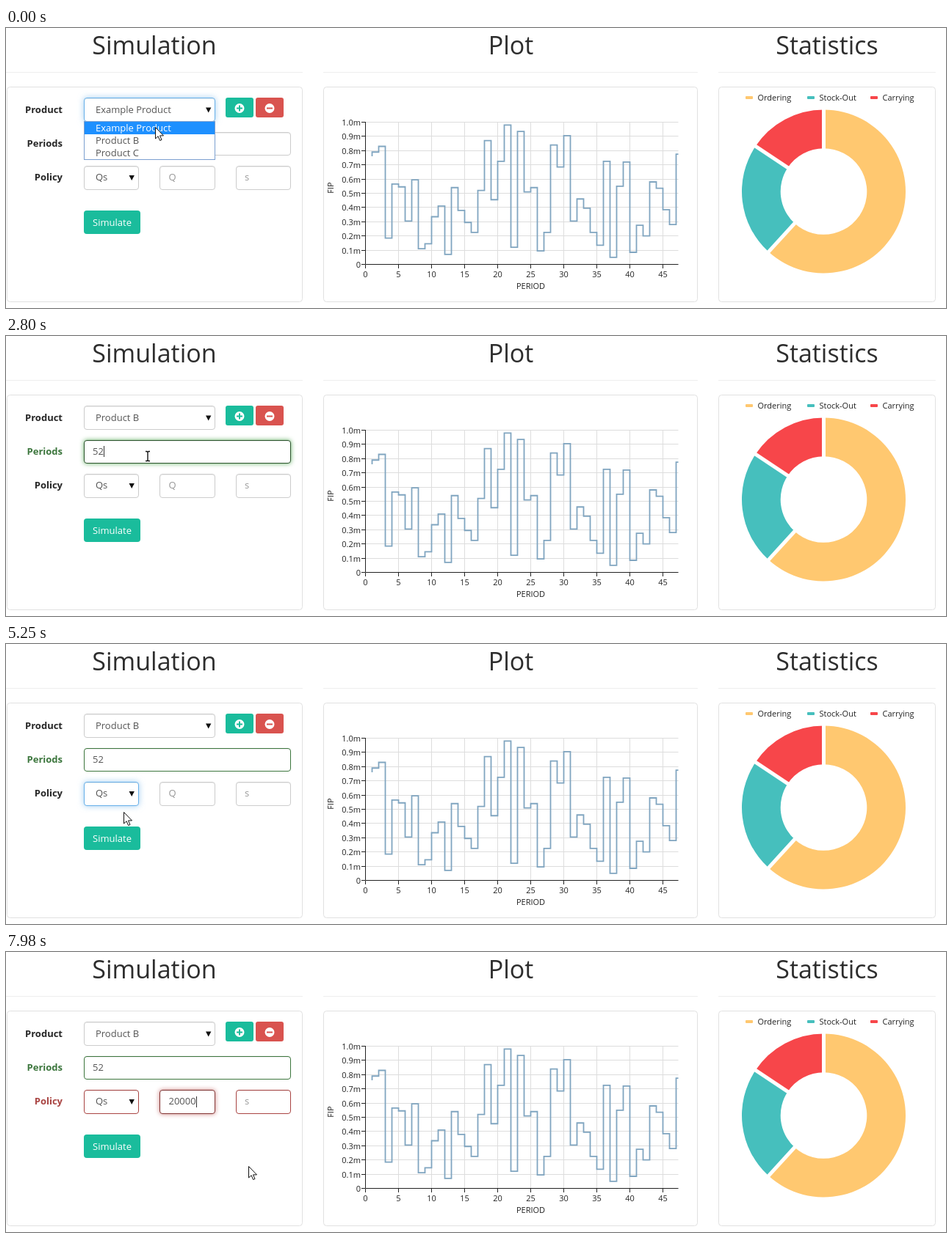
An HTML page for the animation above (8000 ms loop, 1280x382 px).

```html
<!DOCTYPE html>
<html lang="en">
<head>
<meta charset="utf-8">
<title>Inventory simulation</title>
<style>
  html, body { margin: 0; width: 100%; height: 100%; overflow: hidden; background: #fff; }
  .field {
    position: absolute; box-sizing: border-box; height: 33px;
    border: 1px solid #ccc; border-radius: 4px; background: #fff;
  }
  svg { position: absolute; left: 0; top: 0; width: 1280px; height: 382px; }
  text { font: 13px "Open Sans", "Noto Sans", sans-serif; fill: #555; white-space: pre; }
  .title { font-size: 34px; font-weight: 500; fill: #2d2d2d; text-anchor: middle; }
  .label { font-weight: 700; fill: #262626; text-anchor: end; }
  .hint { fill: #999; }
  .small { font-size: 11px; fill: #222; }
  .mid { text-anchor: middle; }
  .end { text-anchor: end; }
  .white { fill: #fff; }
  .frame { fill: none; stroke: #e1e1e1; }
  .grid { stroke: #ddd; }
  .axis { stroke: #222; fill: none; }
  .list { fill: #fff; stroke: #7b9fd0; }
</style>
</head>
<body>
<div class="field" id="product" style="left:106px;top:95px;width:179px"></div>
<div class="field" id="periods" style="left:106px;top:142px;width:282px;height:32px"></div>
<div class="field" id="policy" style="left:106px;top:188px;width:75px"></div>
<div class="field" id="qty" style="left:209px;top:188px;width:76px"></div>
<div class="field" id="level" style="left:313px;top:188px;width:75px"></div>

<svg viewBox="0 0 1280 382">
  <text class="title" x="202" y="36">Simulation</text>
  <text class="title" x="687.5" y="36">Plot</text>
  <text class="title" x="1118" y="36">Statistics</text>
  <path d="M0 60.5H404M432 60.5H942M970 60.5H1266" stroke="#eee"/>
  <rect class="frame" x="1.5" y="80.5" width="402" height="293" rx="4"/>
  <rect class="frame" x="432.5" y="80.5" width="509" height="293" rx="4"/>
  <rect class="frame" x="970.5" y="80.5" width="295" height="293" rx="4"/>

  <text class="label" x="77" y="116">Product</text>
  <text class="label" id="periodsLabel" x="77" y="162">Periods</text>
  <text class="label" id="policyLabel" x="77" y="208">Policy</text>
  <text id="productText" x="122" y="116"></text>
  <text id="periodsText" x="118" y="162"></text>
  <text x="122" y="208">Qs</text>
  <text id="qtyText" x="221.5" y="208"></text>
  <text class="hint" x="325" y="208">s</text>
  <path d="M272 108.5h7.4l-3.7 7zM167.5 201h7.4l-3.7 7z" fill="#111"/>

  <rect x="299" y="95" width="38" height="27" rx="3" fill="#1abc9c"/>
  <rect x="340" y="95" width="38" height="27" rx="3" fill="#d9534f"/>
  <circle cx="318" cy="109.5" r="6.5" fill="#fff"/>
  <circle cx="359" cy="109.5" r="6.5" fill="#fff"/>
  <path d="M314 109.5h8M318 105.5v8" stroke="#1abc9c" stroke-width="2"/>
  <path d="M355 109.5h8" stroke="#d9534f" stroke-width="2"/>
  <rect x="106" y="249" width="77" height="32" rx="4" fill="#1abc9c"/>
  <text class="white mid" x="144.5" y="270">Simulate</text>

  <g id="chart"></g>
  <text class="small mid" x="714.5" y="355.5">PERIOD</text>
  <text class="small mid" transform="translate(446 218) rotate(-90)">FIP</text>
  <g id="donut"></g>

  <g id="productList"></g>
  <g id="policyList"></g>
  <rect id="caret" width="1" height="15" fill="#333"/>
  <g id="cursor">
    <path id="arrow" d="M.5 .5V16l3.6-3.3 2.5 5.8 2.4-1-2.5-5.6h5z" fill="#fff" stroke="#111"/>
    <path id="beam" d="M-3-6.5h2l1 1 1-1h2M0-5.5v11M-3 6.5h2l1-1 1 1h2" fill="none" stroke="#111" stroke-width="1.4"/>
  </g>
</svg>

<script>
const LOOP = 8000, TICK = 70;
const $ = id => document.getElementById(id);

function add(parent, tag, attrs, text) {
  const el = document.createElementNS('http://www.w3.org/2000/svg', tag);
  for (const name in attrs) el.setAttribute(name, attrs[name]);
  if (text !== undefined) el.textContent = text;
  parent.append(el);
  return el;
}

function drawChart() {
  const g = $('chart'), right = 915.5;
  const px = period => 489.5 + period * 9;
  const py = percent => 322.5 - percent * 1.94;
  const percents = [
    79, 83, 18.5, 56.5, 54.5, 30.5, 59.5, 11, 14.5, 33.5, 41, 7, 54, 38, 29.5, 22.5,
    52, 87, 45.5, 72.5, 98, 12, 93.5, 51, 54, 9.5, 22.5, 84, 68.5, 90.5, 30.5, 46,
    39.5, 22.5, 13.5, 72.5, 5, 55, 72, 8.5, 27.5, 20, 58, 53.5, 38.5, 28
  ];
  for (let i = 0; i <= 10; i++) {
    const y = Math.floor(py(i * 10)) + .5;
    add(g, 'path', { class: 'grid', d: `M490 ${y}H${right}` });
    add(g, 'path', { class: 'axis', d: `M484 ${y}h5` });
    add(g, 'text', { class: 'small end', x: 483, y: y + 4 }, i ? (i / 10).toFixed(1) + 'm' : '0');
  }
  for (let p = 0; p <= 45; p += 5) {
    add(g, 'path', { class: 'grid', d: `M${px(p)} 128V322` });
    add(g, 'path', { class: 'axis', d: `M${px(p)} 323v5` });
    add(g, 'text', { class: 'small mid', x: px(p), y: 340 }, p);
  }
  add(g, 'path', { class: 'axis', d: `M489.5 128V322.5H${right}` });
  const steps = percents.map((v, i) => `V${py(v)}H${px(i + 2)}`).join('');
  add(g, 'path', {
    d: `M${px(1)} ${py(76)}${steps}V${py(77.5)}H${right}`,
    fill: 'none', stroke: '#80a5c0', 'stroke-width': 1.8
  });
}

function drawDonut() {
  const g = $('donut'), cx = 1113.5, cy = 223, outer = 111.5, inner = 58.8;
  const point = (deg, r) => {
    const a = deg * Math.PI / 180;
    return `${cx + r * Math.sin(a)} ${cy - r * Math.cos(a)}`;
  };
  const slices = [
    ['Ordering', '#ffc870', 0, 222.4, 1007],
    ['Stock-Out', '#46bfbd', 222.4, 303.6, 1091],
    ['Carrying', '#f7464a', 303.6, 360, 1177]
  ];
  for (const [name, fill, from, to, x] of slices) {
    const big = to - from > 180 ? 1 : 0;
    add(g, 'path', { fill, d: `M${point(from, outer)}A${outer} ${outer} 0 ${big} 1 ${point(to, outer)}` +
      `L${point(to, inner)}A${inner} ${inner} 0 ${big} 0 ${point(from, inner)}z` });
    add(g, 'rect', { x, y: 93, width: 10, height: 4, rx: 1, fill });
    add(g, 'text', { class: 'small', x: x + 16.5, y: 98.5 }, name);
  }
  for (const slice of slices)
    add(g, 'path', { d: `M${point(slice[2], inner - 2)}L${point(slice[2], outer + 2)}`, stroke: '#fff', 'stroke-width': 5 });
}

const ROW = 17;

function makeList(id, top, width, names) {
  const g = $(id);
  add(g, 'rect', { class: 'list', x: 106.5, y: top + .5, width: width - 1, height: names.length * ROW + 1 });
  const bar = add(g, 'rect', { x: 107, width: width - 2, height: ROW, fill: '#1e90ff' });
  const rows = names.map((name, i) => add(g, 'text', { x: 122, y: top + 13.5 + i * ROW }, name));
  return (open, y) => {
    g.style.display = open ? '' : 'none';
    const pick = Math.max(0, Math.min(names.length - 1, Math.floor((y - top - 1) / ROW)));
    bar.setAttribute('y', top + 1 + pick * ROW);
    rows.forEach((row, i) => row.classList.toggle('white', i === pick));
  };
}

// Border colour, glow colour, glow opacity, glow blur
const LOOKS = {
  plain: [204, 204, 204, 102, 175, 233, 0, 8],
  blue: [102, 175, 233, 102, 175, 233, .6, 8],
  green: [60, 118, 61, 103, 177, 104, 0, 6],
  greenFocus: [43, 84, 44, 103, 177, 104, 1, 6],
  red: [169, 68, 66, 206, 132, 131, 0, 6],
  redFocus: [132, 53, 52, 206, 132, 131, 1, 6]
};

// Each look begins at a tick and fades in over the next two
const FIELDS = {
  product: [[-9, 'blue'], [18, 'plain']],
  periods: [[-9, 'plain'], [18, 'blue'], [30, 'greenFocus'], [53, 'green']],
  policy: [[-9, 'plain'], [53, 'blue'], [85, 'plain'], [93, 'red']],
  qty: [[-9, 'plain'], [85, 'blue'], [93, 'redFocus']],
  level: [[-9, 'plain'], [93, 'red']]
};

// First tick, last tick, end point
const MOVES = [
  [1, 3, 202, 152], [11, 11, 201, 154], [13, 14, 197, 157], [40, 45, 172, 201],
  [52, 52, 171, 203], [54, 61, 162, 241], [63, 65, 160, 229], [77, 83, 221, 211], [96, 97, 330, 292]
];

const PERIOD_KEYS = [30, 36], QTY_KEYS = [93, 104, 109, 111, 114];
const PERIOD_CARET = [[18, 25], [30, 42], [49, 52]], QTY_CARET = [[85, 102], [104, 115]];

const lerp = (a, b, k) => a + (b - a) * k;
const within = (n, spans) => spans.some(([from, to]) => n >= from && n < to);

function cursorAt(n) {
  let x = 203, y = 135;
  for (const [from, to, endX, endY] of MOVES) {
    if (n < from) break;
    const k = Math.min(1, (n - from + 1) / (to - from + 1));
    x = lerp(x, endX, k);
    y = lerp(y, endY, k);
  }
  return [Math.round(x), Math.round(y)];
}

function paintField(id, n) {
  const keys = FIELDS[id];
  let i = keys.length - 1;
  while (n < keys[i][0]) i--;
  const k = [0, .65, 1][Math.min(2, n - keys[i][0])];
  const to = LOOKS[keys[i][1]], from = i ? LOOKS[keys[i - 1][1]] : to;
  const [r, g, b, gr, gg, gb, alpha, blur] = to.map((v, j) => lerp(from[j], v, k));
  $(id).style.borderColor = `rgb(${r}, ${g}, ${b})`;
  $(id).style.boxShadow =
    `inset 0 1px 1px rgba(0, 0, 0, .075), 0 0 ${blur}px rgba(${gr}, ${gg}, ${gb}, ${alpha})`;
}

function typeInto(id, value, keys, hint, n) {
  const count = keys.filter(tick => n >= tick).length;
  $(id).textContent = value.slice(0, count) || hint;
  $(id).classList.toggle('hint', !count);
  return count;
}

drawChart();
drawDonut();
const showProducts = makeList('productList', 127, 179, ['Example Product', 'Product B', 'Product C']);
const showPolicies = makeList('policyList', 220, 75, ['Qs', 'RS']);

function render(n) {
  const [x, y] = cursorAt(n);
  const overPeriods = n >= 11 && x > 106 && x < 388 && y > 142 && y < 174;
  const overQty = x > 209 && x < 285 && y > 188 && y < 220;
  const beam = overPeriods || overQty;
  $('cursor').setAttribute('transform', `translate(${x} ${y})`);
  $('beam').style.display = beam ? '' : 'none';
  $('arrow').style.display = beam ? 'none' : '';

  for (const id in FIELDS) paintField(id, n);
  $('periodsLabel').style.fill = n >= 30 ? '#3c763d' : '';
  $('policyLabel').style.fill = n >= 93 ? '#a94442' : '';
  $('productText').textContent = n < 11 ? 'Example Product' : 'Product B';
  showProducts(n < 11, y);
  showPolicies(n >= 53 && n < 75, y);

  const periodCount = typeInto('periodsText', '52', PERIOD_KEYS, 'Set the number of periods', n);
  const qtyCount = typeInto('qtyText', '20000', QTY_KEYS, 'Q', n);
  const inPeriods = within(n, PERIOD_CARET), inQty = within(n, QTY_CARET);
  $('caret').style.display = inPeriods || inQty ? '' : 'none';
  $('caret').setAttribute('x', Math.round(inPeriods ? 118 + periodCount * 7.5 : 221.4 + qtyCount * 7.5));
  $('caret').setAttribute('y', inPeriods ? 150 : 197);
}

const start = performance.now();
function frame() {
  const t = (performance.now() - start + 2) % LOOP;
  render(Math.floor(t / TICK));
  requestAnimationFrame(frame);
}
frame();
</script>
</body>
</html>
```
